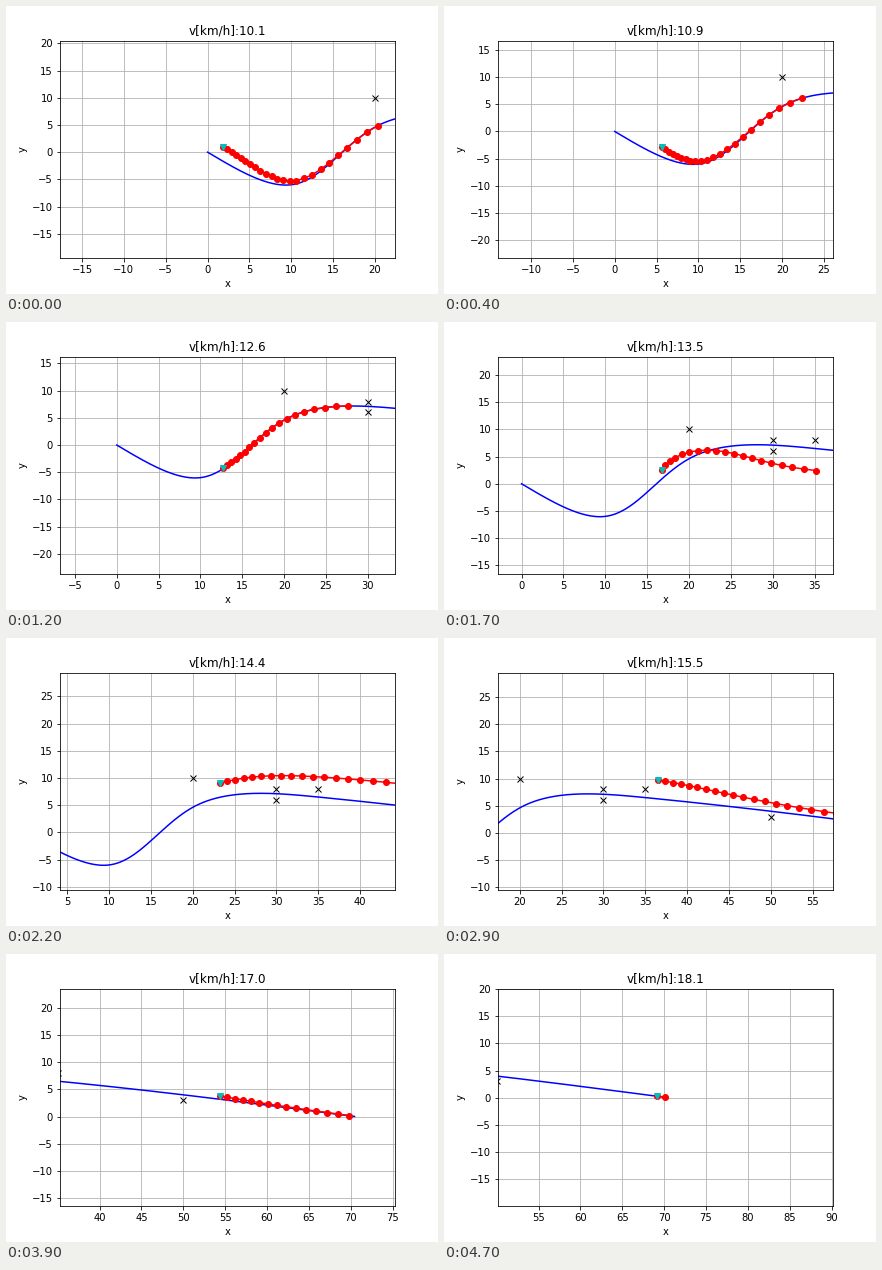
A matplotlib script for the animation above (4800 ms loop, 432x288 px).

```python
import matplotlib.pyplot as plt
import numpy as np
from matplotlib.animation import FuncAnimation
from numpy.polynomial import Polynomial

FRAMES, INTERVAL = 48, 100
DT = 0.2
HORIZONS = np.arange(4.0, 5.0, DT)
OFFSETS = np.arange(-7.0, 7.0, 1.0)
CRUISE = 30 / 3.6
SPEEDS = (25 / 3.6, CRUISE)
MAX_ACCEL, MAX_CURVATURE = 2.0, 1.0
RADIUS = 2.0
K_JERK = K_TIME = 0.1
VIEW = 20

WAYPOINTS = np.array([(0, 0), (10, -6), (20.5, 5), (35, 6.5), (70.5, 0)])
OBSTACLES = np.array([(20, 10), (30, 6), (30, 8), (35, 8), (50, 3)])


class Spline:
    """Natural cubic spline through 2D points, by chord length."""

    def __init__(self, pts):
        h = np.hypot(*np.diff(pts, axis=0).T)
        n = len(pts)
        slope = np.diff(pts, axis=0) / h[:, None]
        mat, rhs = np.eye(n), np.zeros((n, 2))
        for i in range(1, n - 1):
            mat[i, i - 1:i + 2] = h[i - 1], 2 * (h[i - 1] + h[i]), h[i]
            rhs[i] = 3 * (slope[i] - slope[i - 1])
        self.knots = np.concatenate(([0], np.cumsum(h)))
        self.length = self.knots[-1]
        self.a = pts
        self.c = np.linalg.solve(mat, rhs)
        self.b = slope - h[:, None] * (2 * self.c[:-1] + self.c[1:]) / 3
        self.d = np.diff(self.c, axis=0) / (3 * h[:, None])

    def __call__(self, s):
        """Position and heading at the arc lengths s."""
        i = np.searchsorted(self.knots, s, side="right") - 1
        i = np.clip(i, 0, len(self.b) - 1)
        u = (s - self.knots[i])[:, None]
        a, b, c, d = self.a[i], self.b[i], self.c[i], self.d[i]
        pos = a + u * (b + u * (c + u * d))
        dx, dy = (b + u * (2 * c + 3 * u * d)).T
        return pos, np.arctan2(dy, dx)


def lateral(d, vel, acc, goal, T):
    mat = [[T**3, T**4, T**5],
           [3 * T**2, 4 * T**3, 5 * T**4],
           [6 * T, 12 * T**2, 20 * T**3]]
    rhs = [goal - d - vel * T - acc * T**2 / 2, -vel - acc * T, -acc]
    return Polynomial([d, vel, acc / 2, *np.linalg.solve(mat, rhs)])


def longitudinal(s, vel, goal, T):
    dv = goal - vel
    return Polynomial([s, vel, 0, dv / T**2, -dv / (2 * T**3)])


def jerk(poly, t):
    return np.sum(poly.deriv(3)(t) ** 2)


def to_world(road, s, d):
    keep = s <= road.length
    pos, yaw = road(s[keep])
    normal = np.column_stack((-np.sin(yaw), np.cos(yaw)))
    return pos + d[keep][:, None] * normal


def feasible(pts, accel):
    if np.any(np.abs(accel) > MAX_ACCEL):
        return False
    step = np.diff(pts, axis=0)
    yaw = np.arctan2(step[:, 1], step[:, 0])
    bend = np.diff(yaw) / np.hypot(*step.T)[:-1]
    if np.any(np.abs(bend) > MAX_CURVATURE):
        return False
    gap = pts[:, None] - OBSTACLES[None]
    return np.all(np.sum(gap**2, axis=2) > RADIUS**2)


def best_path(road, s, speed, d, d_vel, d_acc):
    options = []
    for T in HORIZONS:
        t = np.arange(0, T, DT)
        ahead = []
        for goal in SPEEDS:
            p = longitudinal(s, speed, goal, T)
            miss = CRUISE - p.deriv()(t[-1])
            ahead.append((K_JERK * jerk(p, t) + K_TIME * T + miss**2, p))
        for goal in OFFSETS:
            q = lateral(d, d_vel, d_acc, goal, T)
            side = K_JERK * jerk(q, t) + K_TIME * T + q(t[-1]) ** 2
            options += [(side + cost, t, p, q) for cost, p in ahead]
    for _, t, p, q in sorted(options, key=lambda o: o[0]):
        pts = to_world(road, p(t), q(t))
        if feasible(pts, p.deriv(2)(t)):
            return pts, p, q
    return None


def drive(road):
    """Replan every DT until the end of the road; list (speed, path)."""
    end = road(np.array([road.length]))[0][0]
    state = (0.0, 10 / 3.6, 2.0, 0.0, 0.0)
    steps = []
    while len(steps) < 200:
        found = best_path(road, *state)
        if found is None:
            break
        pts, p, q = found
        if len(pts) < 3 or np.hypot(*(pts[1] - end)) <= 1:
            break
        state = (p(DT), p.deriv()(DT), q(DT), q.deriv()(DT), q.deriv(2)(DT))
        steps.append((state[1] * 3.6, pts[1:]))
    return steps


road = Spline(WAYPOINTS)
course = road(np.arange(0, road.length, 0.1))[0]
steps = drive(road)

fig, ax = plt.subplots(figsize=(6, 4), dpi=72)
fig.subplots_adjust(left=0.125, right=0.9, bottom=0.125, top=0.88)


def draw(i):
    speed, path = steps[round(i * (len(steps) - 1) / (FRAMES - 1))]
    ax.clear()
    ax.plot(*course.T, "-b")
    ax.plot(*OBSTACLES.T, "xk")
    ax.plot(*path.T, "-or")
    ax.plot(*path[0], "vc")
    x, y = path[1]
    ax.set(xlim=(x - VIEW, x + VIEW), ylim=(y - VIEW, y + VIEW),
           xlabel="x", ylabel="y", title="v[km/h]:" + str(speed)[:4])
    ax.grid(True)


anim = FuncAnimation(fig, draw, frames=FRAMES, interval=INTERVAL,
                     init_func=lambda: [], repeat=True, repeat_delay=0)
plt.show()
```
